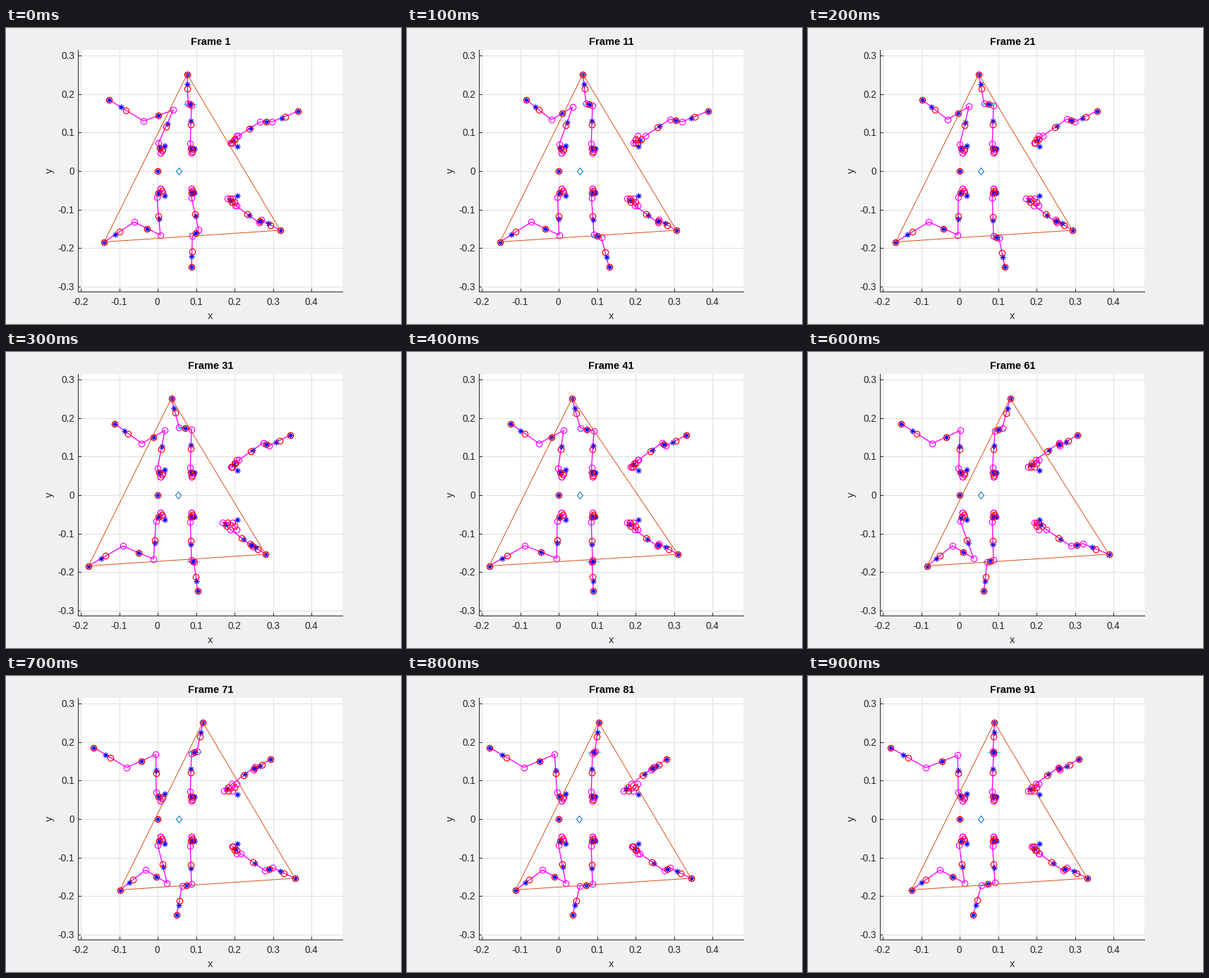
A matplotlib script that plays this animation: 560x420 px, repeating every 1000 ms.

```python
from math import cos, floor, pi

import numpy as np
import matplotlib.pyplot as plt
from matplotlib.animation import FuncAnimation

W, H, DPI = 560, 420, 80
FRAMES, INTERVAL = 10, 100
PT = 72 / DPI                      # points per pixel
SCALE, X0, Y0 = 545.5, 214.6, 202.5
LEFT, RIGHT, TOP, BOTTOM = 101.5, 477, 31, 373.5
INK, MAGENTA, RED, BLUE = "#262626", "#ff00ff", "#ff0000", "#0000ff"
FONT = "Liberation Sans"

# Foot travel behind its foremost point, as (phase, pixels): a long even
# stance, then a quick swing forward.
STRIDE = [(1, 0), (8, -52), (9, -52.5), (10, -23.5)]
FRONT_STRIDE = [(1, 0), (2, -17), (8, -58.5), (9, -42.5), (10, -12.5)]
LIFT = [(1, .2), (2, 0), (8, 0), (9, .2), (10, 1)]

# Upper legs. Each joint is (x, y, share of foot travel, lift dx, lift dy).
REAR = dict(
    foot=(169, 101.5), stride=STRIDE,
    knee=(203, 129.7, .715, 9, 2.3),
    top=(231.5, 111.3, .427, 15.7, 5),
    low=(215.7, 165, .06, 2, -2),
    hinge=None, base=(219, 177), arm=(222, 171.5), servo=(225, 167),
    shin_mass=.36, rod_mass=.47)
MIDDLE = dict(
    foot=(286.5, 65.7), stride=STRIDE,
    knee=(275, 107, .57, 2.6, 3),
    top=(263, 109.8, 0, 10, 9),
    low=(261.2, 164.2, 0, 1.8, 0),
    hinge=None, base=(263, 177), arm=(265, 172), servo=(267, 171),
    shin_mass=.34, rod_mass=.5)
FRONT = dict(
    foot=(426.5, 118), stride=FRONT_STRIDE,
    knee=(391, 133, .77, -4, 0),
    top=(374.6, 128.7, .42, -9.4, 4.5),
    low=(338.5, 153.3, .35, -5, 0),
    hinge=(-11, 10), base=(321, 163), arm=(327, 153), servo=(327.5, 167.5),
    shin_mass=.64, rod_mass=.65)
LEGS = [REAR, MIDDLE, FRONT]


def keyed(keys, phase):
    return np.interp(phase, *zip(*keys), period=FRAMES)


def between(a, b, k=.5):
    return a + (b - a) * k


def leg_pose(leg, phase, lower):
    """Return the rod path, joints, mass centres, stars and knee axle."""
    travel, lift = keyed(leg["stride"], phase), keyed(LIFT, phase)

    def joint(name):
        x, y, share, dx, dy = leg[name]
        return np.array([x + share * travel + dx * lift, y + dy * lift])

    foot = np.array(leg["foot"]) + (travel, 0)
    knee, top, low = joint("knee"), joint("top"), joint("low")
    base, arm = np.array(leg["base"]), np.array(leg["arm"])
    hinge = low + leg["hinge"] if leg["hinge"] else base
    pivot = between(knee, top)

    path = [foot, knee, top, low, hinge, base, arm]
    centres = [foot, between(foot, knee), pivot, between(top, low),
               between(low, hinge), between(base, arm)]
    if leg["hinge"]:
        centres.append(between(hinge, base))
    stars = [foot, between(foot, knee, leg["shin_mass"]), pivot,
             between(top, low, .415), between(low, hinge, leg["rod_mass"]),
             leg["servo"]]
    axle = [pivot - (9, 0), pivot + (9, 0)] if leg is MIDDLE else [pivot]

    parts = [np.array(p, float) for p in (path, path[1:], centres, stars, axle)]
    if lower:
        for part in parts:
            part[:, 1] = 2 * Y0 - part[:, 1]
    return parts


fig = plt.figure(figsize=(W / DPI, H / DPI), dpi=DPI, facecolor="#f0f0f0")
ax = fig.add_axes([0, 0, 1, 1])
ax.set_xlim(0, W)
ax.set_ylim(H, 0)
ax.axis("off")


def label(x, y, text, size, **style):
    style = dict(ha="center", va="center", color=INK) | style
    return ax.text(x, y, text, fontsize=size * PT, family=FONT, **style)


def stroke(x, y, color, width=1):
    return ax.plot(x, y, color=color, lw=width * PT)[0]


def markers(shape, color, size, width):
    return ax.plot([], [], ls="", marker=shape, ms=size * PT, mfc="none",
                   mec=color, mew=width * PT)[0]


def draw_axes():
    ax.fill([LEFT, RIGHT, RIGHT, LEFT], [TOP, TOP, BOTTOM, BOTTOM],
            color="white", lw=0)
    for k in range(-3, 5):
        value = k / 10
        x = floor(X0 + value * SCALE) + .5
        y = floor(Y0 - value * SCALE) + .5
        if k >= -2:
            stroke([x, x], [TOP, BOTTOM], "#dfdfdf")
            stroke([x, x], [BOTTOM - 4, BOTTOM], INK)
            label(x, 389.2, f"{value:g}", 13.6)
        if k <= 3:
            stroke([LEFT, RIGHT], [y, y], "#dfdfdf")
            stroke([LEFT, LEFT + 4], [y, y], INK)
            label(97, y + 1.5, f"{value:g}", 13.6, ha="right")
    stroke([LEFT, LEFT, RIGHT], [TOP, BOTTOM, BOTTOM], INK)
    label(289.7, 413, "x", 14.67, va="baseline")
    label(62, Y0, "y", 14.67, rotation=90)


draw_axes()
title = label(289.7, 24.5, "", 14.67, va="baseline", color="black",
              weight="bold")
axles = stroke([], [], "#00ffff", 1.2)
rods = stroke([], [], MAGENTA, 1.35)
joint_marks = markers("o", MAGENTA, 8.4, 1.2)
star_marks = markers((8, 2, 0), BLUE, 7.8, 1)
centre_marks = markers("o", RED, 8.4, 1.2)
triangle = stroke([], [], "#d95319")
RHOMBUS = [(0, 1), (.8, 0), (0, -1), (-.8, 0), (0, 1)]
diamond = markers(RHOMBUS, "#0072bd", 10, 1)


def update(i):
    gap = np.full((1, 2), np.nan)
    origin = np.array([[X0, Y0]])
    paths, joints, centres, stars, spokes = [], [], [origin], [origin], []
    support = []
    for lower in (False, True):
        for n, leg in enumerate(LEGS):
            # Alternate legs form two tripods, half a cycle apart.
            second = lower != (n == 1)
            # The middle leg changes sides within each tripod.
            phase = (i + FRAMES // 2 * second) % FRAMES
            path, joint, centre, star, axle = leg_pose(leg, phase, lower)
            paths += [path, gap]
            joints.append(joint)
            centres.append(centre)
            stars.append(star)
            spokes += [axle, gap]
            if second:
                support.append(path[0])
    for artist, parts in ((rods, paths), (joint_marks, joints),
                          (centre_marks, centres), (star_marks, stars),
                          (axles, spokes)):
        artist.set_data(*np.concatenate(parts).T)
    triangle.set_data(*np.array(support + support[:1]).T)
    diamond.set_data([244.8 + .8 * cos(2 * pi * (i - .5) / 5)], [Y0])
    title.set_text(f"Frame {10 * i + 1}")
    return (axles, rods, joint_marks, star_marks, centre_marks, triangle,
            diamond, title)


anim = FuncAnimation(fig, update, frames=FRAMES, interval=INTERVAL,
                     repeat=True, repeat_delay=0, blit=False)
plt.show()
```
